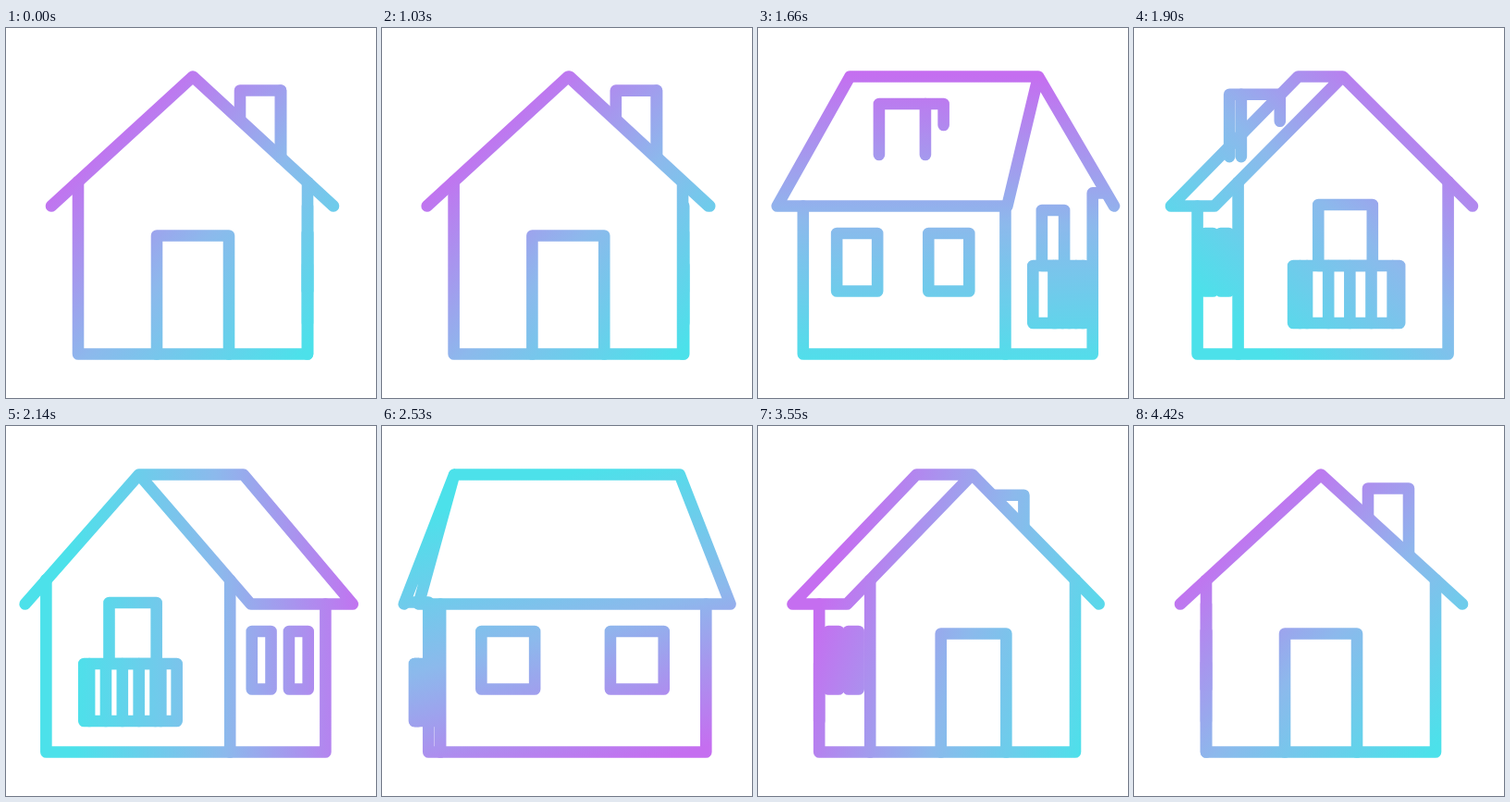
Animation, 400 px wide and 400 px high, one loop 4.45 s. Source, as an HTML page with a canvas:

```html
<!DOCTYPE html>
<html>
<head>
<meta charset="utf-8">
<style>
html, body { margin: 0; width: 100%; height: 100%; overflow: hidden; background: #fff; }
canvas { display: block; }
</style>
</head>
<body>
<canvas id="stage" width="400" height="400"></canvas>
<script>
const ctx = document.getElementById('stage').getContext('2d');
const LOOP = 4450, HOLD = 1000;
const RIDGE = 52.5, EAVE = 192.5, FLOOR = 352.5, WALL_TOP = 166;

// Cubic bezier easing whose handles are (x1, 0) and (x2, 1)
function ease(x, x1, x2) {
  let lo = 0, hi = 1, s;
  for (let i = 0; i < 24; i++) {
    s = (lo + hi) / 2;
    const bx = 3 * x1 * s * (1 - s) ** 2 + 3 * x2 * s * s * (1 - s) + s ** 3;
    if (bx < x) lo = s; else hi = s;
  }
  return s * s * (3 - 2 * s);
}

function setGradient(angle) {
  const cx = 232, cy = 212, dx = 162 * Math.cos(angle), dy = 162 * Math.sin(angle);
  const g = ctx.createLinearGradient(cx - dx, cy - dy, cx + dx, cy + dy);
  g.addColorStop(0, '#c56ef0');
  g.addColorStop(0.5, '#8cb9ec');
  g.addColorStop(1, '#4ce1ea');
  ctx.strokeStyle = g;
}

// phase runs 0..8: front 0, chimney side 2, back 4, plain side 6.
// Each pose is described with the gable on the left and mirrored when needed.
function drawHouse(phase) {
  const quarter = phase % 4;
  const mirrored = quarter >= 2;
  const r = mirrored ? 4 - quarter : quarter;
  const at = (gable, corner, side) => r < 1
    ? gable + (corner - gable) * r
    : corner + (side - corner) * (r - 1);
  const mirrorSum = at(404, 400, 402);
  const X = x => mirrored ? mirrorSum - x : x;

  const trace = points => {
    ctx.beginPath();
    points.forEach(([x, y]) => ctx.lineTo(X(x), y));
  };
  const line = (...points) => { trace(points); ctx.stroke(); };
  const box = (l, t, rt, b) => {
    trace([[l, t], [rt, t], [rt, b], [l, b]]);
    ctx.closePath();
    ctx.stroke();
  };

  const outer = at(78, 28, 52), mid = at(326, 205, 52), far = at(326, 354, 350);
  const apex = at(202, 118, 75), ridge = at(202, 281, 325);
  const eaveOut = at(49, 8, 25), eaveMid = at(354, 225, 25), eaveFar = at(354, 384, 376);

  // Walls
  const outerTop = at(WALL_TOP, WALL_TOP, EAVE);
  const midTop = mid >= eaveMid ? EAVE
    : RIDGE + (EAVE - RIDGE) * (mid - apex) / (eaveMid - apex);
  line([at(78, 28, 25), outerTop], [outer, outerTop], [outer, FLOOR], [far, FLOOR], [far, EAVE]);
  line([mid, midTop], [mid, FLOOR]);

  // Roof
  line([eaveOut, EAVE], [apex, RIDGE], [eaveMid, EAVE], [eaveFar, EAVE], [ridge, RIDGE], [apex, RIDGE]);

  // Side windows
  box(at(326, 239, 97), 222, at(326, 269, 157), 284.5);
  box(at(326, 297, 243), 222, at(326, 327, 303), 284.5);

  if (phase < 2 || phase >= 6) {
    // Front door, and the balcony edge peeking out behind
    const l = at(163, 85, 52), rt = at(241, 143, 52);
    line([l, FLOOR], [l, 224.5], [rt, 224.5], [rt, FLOOR]);
    box(far, 257, at(326, 354, 367), 319);
  } else {
    // Balcony door and railing
    box(at(170, 85.5, 52), at(191, 191, 204), at(234, 131, 52), 257);
    const l = at(139, 60, 33), rt = at(265, 124, 33);
    box(l, 257, at(265, 149, 52), 319);
    for (const f of [0.07, 0.285, 0.5, 0.715, 0.93, 1]) {
      const x = l + (rt - l) * f;
      line([x, 257], [x, 319]);
    }
  }

  if (phase < 4) {
    // Chimney on the visible roof
    const back = at(253, 226, 171), a = at(297, 263, 171), b = at(297, 306, 229);
    const top = at(67.5, 82, 82), foot = at(140, 137, 137);
    line([back, at(99, 105, 105)], [back, top], [b, top], [b, foot]);
    line([a, top], [a, foot]);
  } else if (r < 1) {
    // Chimney sinking behind the gable
    const a = at(107, 129, 129), b = at(151, 173, 173), top = at(67.5, 87, 87);
    ctx.save();
    trace([[apex, RIDGE], [eaveOut, EAVE], [0, EAVE], [0, 0], [apex, 0]]);
    ctx.clip();
    line([a, 140], [a, top], [b, top], [b, 99]);
    ctx.restore();
  }
}

function frame(now) {
  const t = Math.max(0, now % LOOP - HOLD) / (LOOP - HOLD);
  ctx.fillStyle = '#fff';
  ctx.fillRect(0, 0, 400, 400);
  ctx.lineWidth = 12.6;
  ctx.lineCap = ctx.lineJoin = 'round';
  setGradient(Math.PI / 4 + 2 * Math.PI * (t && ease(t, 0.33, 0.4)));
  drawHouse(t && 8 * ease(t, 0.167, 0.248));
  requestAnimationFrame(frame);
}
requestAnimationFrame(frame);
</script>
</body>
</html>
```
